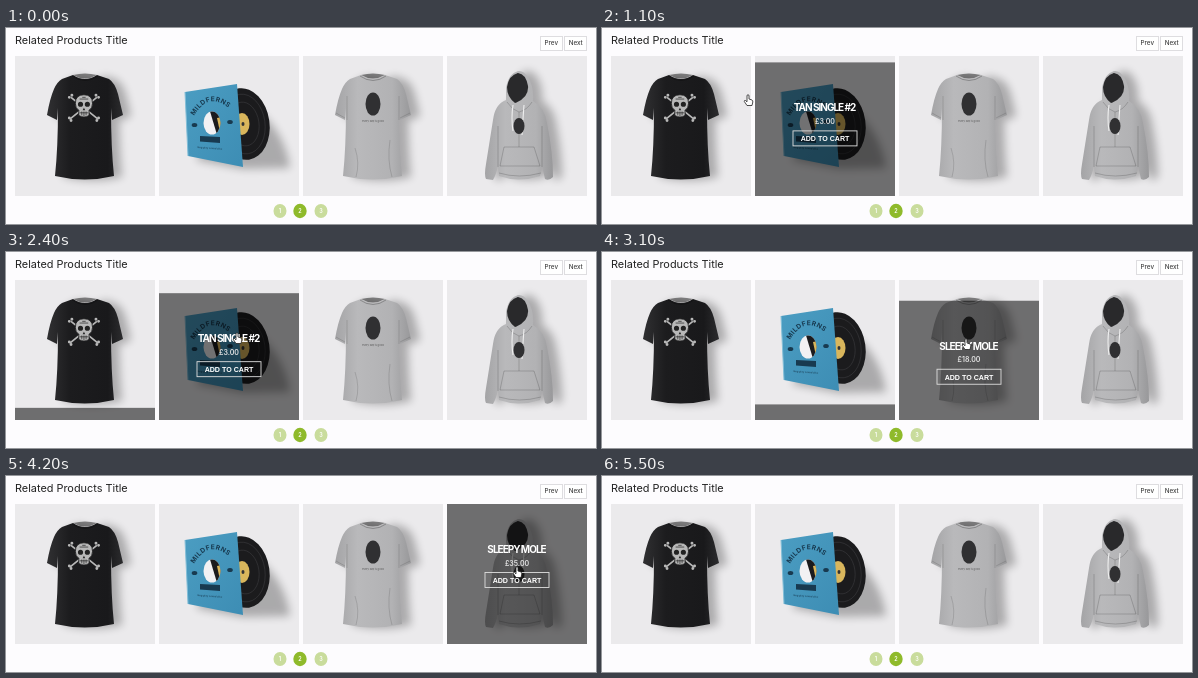
An HTML page for the animation above (6.1 s loop, 590x196 px).

```html
<!DOCTYPE html>
<html lang="en">
<head>
<meta charset="utf-8">
<title>Related products</title>
<style>
html, body { margin: 0; width: 100%; height: 100%; overflow: hidden; background: #fdfcfe; }
svg { display: block; font-family: Inter, "Open Sans", sans-serif; }
.mid { text-anchor: middle; }
.nav rect { fill: #fff; stroke: #dedde0; }
.nav text { font-size: 6.3px; font-weight: 500; fill: #444; }
.dots text { font-size: 5.5px; font-weight: 600; fill: #fff; }
.over text { fill: #fff; text-anchor: middle; }
.over .name { font-size: 10px; font-weight: 700; letter-spacing: -1px; }
.over .price { font-size: 7px; font-weight: 600; fill: #e4e4e4; }
.over .buy { font: bold 7.1px "Liberation Sans", Arial, sans-serif; }
.tiny { font-size: 2.6px; }
.shadow { opacity: .27; filter: url(#blur); }
</style>
</head>
<body>
<svg id="stage" width="590" height="196" viewBox="0 0 590 196">
  <defs>
    <filter id="blur" x="-30%" y="-30%" width="160%" height="160%"><feGaussianBlur stdDeviation="4"/></filter>
    <linearGradient id="black"><stop offset="0" stop-color="#303032"/><stop offset=".3" stop-color="#1c1c1e"/><stop offset=".8" stop-color="#19191b"/><stop offset="1" stop-color="#2c2c2e"/></linearGradient>
    <linearGradient id="grey"><stop offset="0" stop-color="#a4a4a6"/><stop offset=".3" stop-color="#b9b9bb"/><stop offset=".75" stop-color="#b2b2b4"/><stop offset="1" stop-color="#98989a"/></linearGradient>
    <linearGradient id="blue" x2="1" y2="1"><stop offset="0" stop-color="#4b9dc2"/><stop offset="1" stop-color="#3d8db4"/></linearGradient>
    <path id="tee" d="M67 47Q79 55 91 47L103 51Q109 55 112 66L117 87 106 92 105 80Q105 120 108 148Q79 155 49 148Q52 120 52 80L51 92 41 87Q44 70 48 61Q51 54 56 51Z"/>
    <path id="hoodie" d="M500 72Q489 76 487 92L480 136Q478 147 480 151L487 152Q490 147 492 138L493 148Q513 155 534 148L536 138 539 151Q543 153 547 149Q547 125 541 95Q539 80 527 73Q528 58 522 49Q518 43 513 43Q503 44 500 60Z"/>
    <path id="arch" d="M188 88Q204 60 228 85"/>
    <clipPath id="hole"><ellipse cx="206" cy="95" rx="8.500" ry="11.500"/></clipPath>
    <g id="teeNeck" fill="none"><path d="M67 47Q79 44 91 47Q79 54 67 47Z" fill="#000" fill-opacity=".45"/><path d="M66 48Q79 57 92 48" stroke="#000" stroke-opacity=".25"/></g>
    <path id="teeFolds" fill="none" stroke="#000" stroke-opacity=".13" d="M53 68V92M105 68V92M61 120Q66 135 62 149M96 112Q93 132 98 149M42 85L51 90M116 85L106 90"/>
  </defs>

  <text x="9" y="15.600" font-size="10.9" fill="#222">Related Products Title</text>
  <g class="nav mid">
    <rect x="534.5" y="8.5" width="22" height="14"/><text x="545.3" y="17.4">Prev</text>
    <rect x="558.5" y="8.5" width="22" height="14"/><text x="569.7" y="17.4">Next</text>
  </g>
  <g class="dots mid">
    <ellipse cx="274" cy="183" rx="6.5" ry="7" fill="#c9dc9c"/><text x="274" y="184.5">1</text>
    <ellipse cx="294" cy="183" rx="6.700" ry="7.200" fill="#8fba2b"/><text x="294" y="184.5">2</text>
    <ellipse cx="315" cy="183" rx="6.5" ry="7" fill="#c9dc9c"/><text x="315" y="184.5">3</text>
  </g>
  <g id="cards" fill="#ebeaec"></g>

  <g>
    <use href="#tee" class="shadow" x="8" y="1"/>
    <use href="#tee" fill="url(#black)"/><use href="#teeNeck"/>
    <g transform="translate(10 10) scale(.86)">
      <g fill="#b8b8b8" stroke="#b8b8b8">
        <path d="M64 69L95 94M94 69L63 94" stroke-width="2"/>
        <path d="M62 69h0M65 66.500h0M96 69h0M93 66.500h0M62 93h0M64 96h0M96 93h0M94 96h0" stroke-width="3.400" stroke-linecap="round"/>
        <path d="M79 66Q69 66 69 76Q69 82 73 84V90Q79 94 85 90V84Q89 82 89 76Q89 66 79 66Z" stroke="#1c1c1e"/>
      </g>
      <path d="M72 77a3 3 0 1 0 6 0a3 3 0 1 0-6 0M80 77a3 3 0 1 0 6 0a3 3 0 1 0-6 0M79 81l-1.500 3h3Z" fill="#222"/>
      <path d="M74 87H84M76.500 85.500V90M79 85.500V91M81.500 85.500V90M74 71H84M77 69H81" stroke="#222" stroke-width=".8"/>
    </g>
  </g>

  <g>
    <path class="shadow" d="M190 132L237 141 284 140Q280 112 262 92L232 64Z"/>
    <ellipse cx="238" cy="96" rx="25.500" ry="36" transform="rotate(-8 238 96)" fill="#1b1b1d"/>
    <g fill="none" stroke="#3b3b3e" stroke-width=".6">
      <ellipse cx="238" cy="96" rx="21" ry="30" transform="rotate(-8 238 96)"/>
      <ellipse cx="238" cy="96" rx="15" ry="22" transform="rotate(-8 238 96)"/>
    </g>
    <ellipse cx="236" cy="96" rx="7.500" ry="11" fill="#d9b65c"/>
    <ellipse cx="237" cy="96" rx="1.500" ry="2" fill="#333"/>
    <path d="M179 64L231 56 237 139 182 128Z" fill="url(#blue)"/>
    <path d="M179 64L182 128" stroke="#84bfd8"/>
    <g clip-path="url(#hole)"><path d="M195 80H220V112H195Z" fill="#f2f1f3"/><path d="M203 80H222V110H212Z" fill="#1b1b1d"/><path d="M211 90L222 88V106L214 104Z" fill="#d9b65c"/></g>
    <g fill="#183a50">
      <text font-size="6.6" font-weight="700" letter-spacing=".5"><textPath href="#arch">MILDFERNS</textPath></text>
      <ellipse cx="188.500" cy="97" rx="2.800" ry="2"/><ellipse cx="224" cy="94" rx="2.800" ry="2"/>
      <path d="M194 108L214 109V115L194 113.500Z"/>
      <text class="tiny" transform="translate(191 120) rotate(4)">long play sound disc</text>
    </g>
  </g>

  <g transform="translate(288)">
    <use href="#tee" class="shadow" x="9" y="1"/>
    <use href="#tee" fill="url(#grey)"/><use href="#teeNeck"/><use href="#teeFolds"/>
    <ellipse cx="79" cy="76" rx="7.500" ry="11.500" fill="#303032"/>
    <text class="tiny mid" x="79" y="94" fill="#555">every day is good</text>
  </g>

  <g>
    <use href="#hoodie" class="shadow" x="9" y="0"/>
    <use href="#hoodie" fill="url(#grey)"/>
    <path d="M512 45Q503 47 501 59Q501 69 509 75Q523 70 522 58Q520 46 512 45Z" fill="#29292b"/>
    <path d="M501 74Q506 82 513 84Q521 82 526 74M492 98V139M536 98V139M498 119H528L534 138H494ZM493 145Q513 151 535 145M513 84V119" fill="none" stroke="#000" stroke-opacity=".17"/>
    <path d="M507 77Q505 90 507 103M518 77Q517 90 516 107" fill="none" stroke="#efefef" stroke-width="1.100"/>
    <ellipse cx="513" cy="98" rx="5.500" ry="8" fill="#303032"/>
  </g>

  <g id="overs"></g>
  <g id="cursor" stroke="#222" stroke-width=".8" stroke-linejoin="round" fill="#fff">
    <path id="hand" d="M-1 .3Q0-.7 1 .3V4L4 5Q5 5.500 4.800 7L4 10.500H-1L-3.700 6.500Q-3.700 5-2.500 5.500L-1 6.800Z"/>
    <path id="arrow" d="M0 0V7.500L1.800 6 3 8.800 4.200 8.300 3 5.500H5.300Z"/>
  </g>
</svg>
<script>
const LOOP = 6100, STEP = 100, SLIDE = 400, SIZE = 140;
const $ = id => document.getElementById(id);

// hover: [enter, leave] times
const products = [
  { name: 'FOLD YOUR MAPS', price: '£20.00', buy: 'SELECT OPTIONS', width: 79, hover: [[1100, 2142]] },
  { name: 'TAN SINGLE #2', price: '£3.00', buy: 'ADD TO CART', width: 64, hover: [[480, 1075], [2147, 2858]] },
  { name: 'SLEEPY MOLE', price: '£18.00', buy: 'ADD TO CART', width: 64, hover: [[2878, 3775]] },
  { name: 'SLEEPY MOLE', price: '£35.00', buy: 'ADD TO CART', width: 64, hover: [[3795, 5075]] }
];

// cursor path: time, x, y
const path = [
  [300, 225, 2], [500, 226, 36], [900, 206, 82], [1000, 166, 76], [1100, 146, 67],
  [1500, 121, 69], [1900, 121, 69], [2142, 149, 74], [2400, 231, 81], [2600, 236, 86],
  [2865, 295, 86], [3100, 364, 87], [3300, 368, 89], [3785, 439, 91], [4200, 511, 91],
  [4900, 511, 91], [5000, 490, 91], [5100, 360, 88], [5200, 180, 84]
];

products.forEach((p, i) => {
  const x = 9 + i * 144;
  $('cards').innerHTML += `<rect x="${x}" y="28" width="${SIZE}" height="${SIZE}"/>`;
  $('overs').innerHTML += `<svg class="over" x="${x}" y="28" width="${SIZE}" height="${SIZE}" overflow="hidden"><g>
    <rect width="${SIZE}" height="${SIZE}" fill-opacity=".53"/>
    <text class="name" x="69.5" y="49">${p.name}</text>
    <text class="price" x="70" y="61.500">${p.price}</text>
    <rect x="${70 - p.width / 2}" y="68.500" width="${p.width}" height="15" fill="none" stroke="#ddd" stroke-width=".9"/>
    <text class="buy" x="70" y="78.800">${p.buy}</text></g></svg>`;
});
const panels = document.querySelectorAll('.over > g');

// CSS "ease": cubic-bezier(.25, .1, .25, 1)
function ease(x) {
  if (x <= 0) return 0;
  if (x >= 1) return 1;
  const bez = (a, b, u) => 3 * a * u * (1 - u) ** 2 + 3 * b * u * u * (1 - u) + u ** 3;
  let lo = 0, hi = 1;
  for (let i = 0; i < 20; i++) {
    const u = (lo + hi) / 2;
    if (bez(.25, .25, u) < x) lo = u; else hi = u;
  }
  return bez(.1, 1, lo);
}

function cursorAt(t) {
  const i = path.findIndex(p => p[0] > t);
  if (i < 0) return path[path.length - 1].slice(1);
  const a = path[Math.max(i - 1, 0)], b = path[i];
  const k = Math.max(0, (t - a[0]) / (b[0] - a[0] || 1));
  return [a[1] + (b[1] - a[1]) * k, a[2] + (b[2] - a[2]) * k];
}

const show = (el, on) => el.setAttribute('visibility', on ? 'visible' : 'hidden');

function draw(t) {
  products.forEach((p, i) => {
    const shown = p.hover.reduce((s, [on, off]) => s + ease((t - on) / SLIDE) - ease((t - off) / SLIDE), 0);
    panels[i].setAttribute('transform', `translate(0 ${SIZE * (1 - shown)})`);
    show(panels[i], shown > 0);
  });
  const visible = t >= 300 && t < 5300;
  const arrow = t < 500 || (t >= 1200 && t < 2200) || t >= 5100;
  $('cursor').setAttribute('transform', `translate(${cursorAt(t)})`);
  show($('hand'), visible && !arrow);
  show($('arrow'), visible && arrow);
}

function tick() {
  const t = performance.now() % LOOP;
  draw(t - t % STEP);
  requestAnimationFrame(tick);
}
tick();
</script>
</body>
</html>
```
